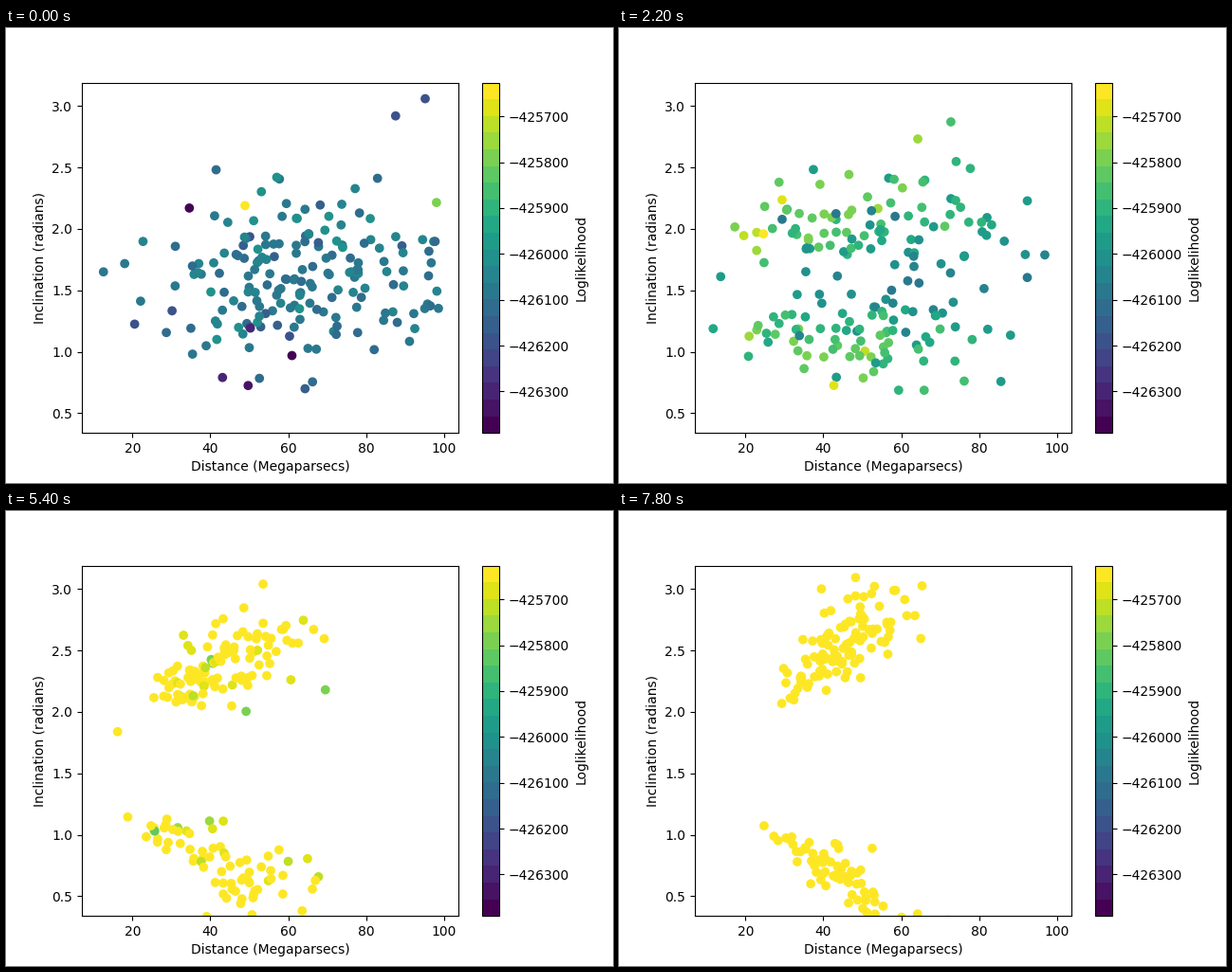
Recreate the animation shown at these times as a matplotlib script. Size 640x480 px, loop 8 s.

```python
import numpy as np
import matplotlib.pyplot as plt
from matplotlib.animation import FuncAnimation

FRAMES, STEP = 40, 200
WALKERS = 190
LOW, HIGH = -426390.4, -425626.4
BASE, GAIN = -426078, 560
REACH = 53  # best-fit distance of a face-on system

# standout starting walkers: distance, inclination, loglikelihood
OUTLIERS = np.array([
    (34.6, 2.17, LOW), (49.7, 0.725, -426350), (48.9, 2.19, HIGH),
    (87.6, 2.92, -426200), (95.2, 3.06, -426200), (98.1, 2.215, -425800),
])

rng = np.random.default_rng(12)


def draw(count, s):
    """Sample (distance, inclination, loglikelihood) at progress s in 0..1."""
    n = 8000
    dist = rng.normal(64 - 17 * s ** 0.5, 23 - 10 * s, n)

    # tilt from edge-on: a central band that gives way to two lobes
    lobe = rng.random(n) < 0.25 + 1.8 * s
    middle = np.abs(rng.normal(0, 0.32 - 0.3 * min(s, 0.5), n))
    outer = rng.lognormal(np.log(0.4 + 0.55 * s ** 2), 0.45 - 0.15 * s, n)
    tilt = np.where(lobe, outer, middle)

    # the fit tightens with progress, soonest for systems that are too near
    ratio = REACH * np.sin(tilt) / np.maximum(dist, 1)
    steep = np.where(ratio > 1, 3 - 2 * s, 1)
    weight = np.exp(-32 * s ** 2.7 * steep * (1 - ratio) ** 2)
    weight[(dist < 10) | (dist > 99) | (tilt > 1.57)] = 0
    pick = rng.choice(n, count, replace=False, p=weight / weight.sum())
    dist, tilt, ratio = dist[pick], tilt[pick], ratio[pick]

    above = rng.random(count) < 0.5 + 0.1 * min(2 * s, 1)
    incl = np.pi / 2 + np.where(above, tilt, -tilt)
    quality = 1.1 * s ** 0.6 + rng.laplace(0, 0.11 - 0.04 * s, count)
    match = np.clip(2 * ratio - ratio ** 2, 0, 1)
    like = BASE + GAIN * quality * match + rng.normal(0, 22, count)
    return np.column_stack([dist, incl, like])


def run():
    """Most walkers stay put in a frame; weak ones are replaced sooner."""
    state = np.vstack([draw(WALKERS - len(OUTLIERS), 0), OUTLIERS])
    chain = [state.copy()]
    for n in range(1, FRAMES):
        weak = state[:, 2] < np.median(state[:, 2])
        moved = rng.random(WALKERS) < np.where(weak, 0.36, 0.2)
        state[moved] = draw(moved.sum(), min((n + 1) / (FRAMES - 1), 1))
        chain.append(state.copy())
    return chain


chain = run()

fig, ax = plt.subplots(figsize=(6.4, 4.8), dpi=100)
dots = ax.scatter(chain[0][:, 0], chain[0][:, 1], c=chain[0][:, 2],
                  cmap=plt.get_cmap("viridis", 21), vmin=LOW, vmax=HIGH)
ax.set(xlim=(6.985, 103.685), ylim=(0.3391, 3.1911),
       xlabel="Distance (Megaparsecs)", ylabel="Inclination (radians)")
fig.colorbar(dots, ax=ax, label="Loglikelihood")


def update(n):
    dots.set_offsets(chain[n][:, :2])
    dots.set_array(chain[n][:, 2])
    return dots,


anim = FuncAnimation(fig, update, frames=FRAMES, interval=STEP,
                     repeat=True, repeat_delay=0)
plt.show()
```
